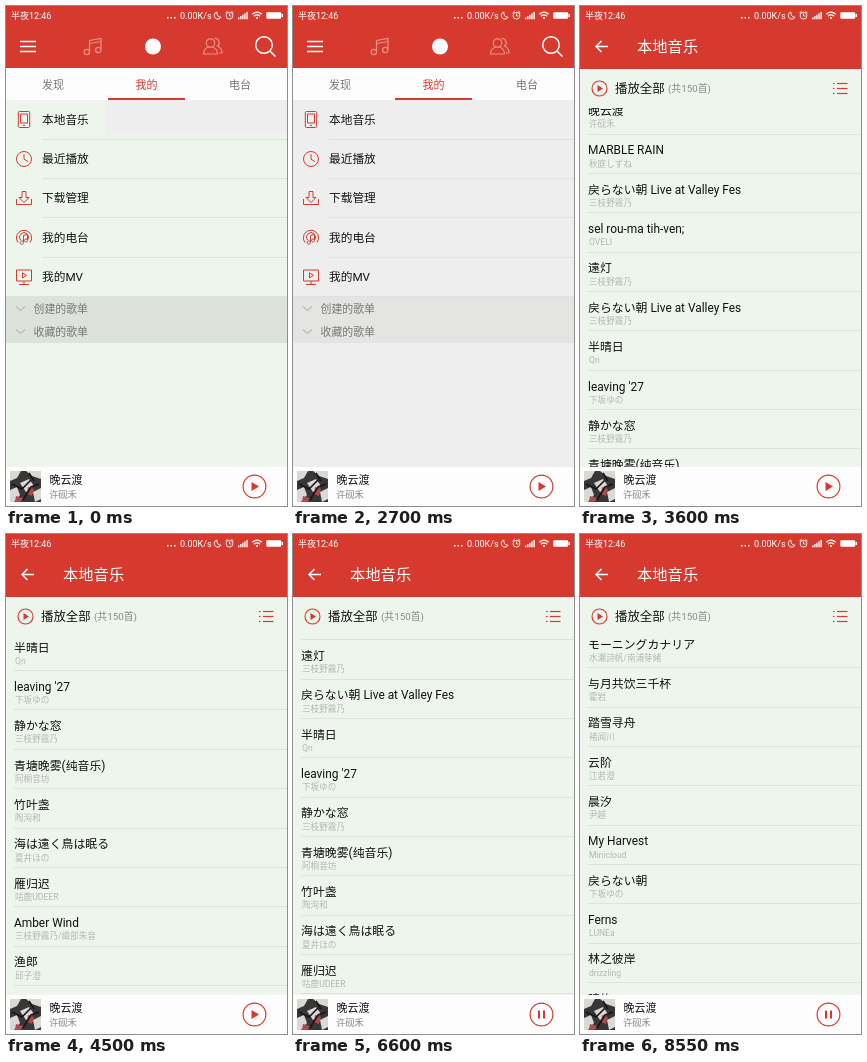
An HTML page with a canvas that plays this animation: 281x500 px, repeating every 8700 ms.

```html
<!DOCTYPE html>
<html lang="zh">
<head>
<meta charset="utf-8">
<style>
html, body { margin: 0; width: 100%; height: 100%; overflow: hidden; }
canvas { display: block; width: 281px; height: 500px; }
</style>
</head>
<body>
<canvas id="stage"></canvas>
<script>
const W = 281, H = 500, LOOP = 8700, STEP = 150;
const RED = '#d6392d', GREEN = '#eef5ed', GREY = '#eeeeee', PALE = '#ec9189';
const ROW = 39.35, LIST_TOP = 102, BAR_TOP = 461;
const canvas = document.getElementById('stage');
const ctx = canvas.getContext('2d');
const ratio = window.devicePixelRatio || 1;
canvas.width = W * ratio;
canvas.height = H * ratio;

const songs = `晚云渡|许砚禾
MARBLE RAIN|秋庭しずね
戻らない朝 Live at Valley Fes|三枝野霧乃
sel rou-ma tih-ven;|OVELI
遠灯|三枝野霧乃
戻らない朝 Live at Valley Fes|三枝野霧乃
半晴日|Qn
leaving '27|下坂ゆの
静かな窓|三枝野霧乃
青塘晚雾(纯音乐)|阿桐音坊
竹叶盏|陶洵和
海は遠く鳥は眠る|夏井ほの
雁归迟|咕鹿UDEER
Amber Wind|三枝野霧乃/織部朱音
渔郎|邱子澄
石桥灯|陶洵和
Slow Lantern|OVELI
听溪|顾绫衣
夜の庭先|夏井ほの
落笔处|D.M舟
一盏秋|顾绫衣
INIT_LUNARDRIFT/.|SORUE
风的经纬度|梁韵苔/梁亦岚
新麦香|邬岑
モーニングカナリア-Ballade Arrange-Mio Solo Ver.|南浦芽緒
云舟寄月声唱版|褚闻川/柏青鸢
策马南山|褚闻川
百川意|听苒
黛石痕|蔺禾
霜桥晚|听苒
Harbor Lines|SORUE
雨の坂道|下坂ゆの
折柳亭|邬岑
松间客|许砚禾
白い岬|南浦芽緒
モーニングカナリア|水瀬詩帆/南浦芽緒
与月共饮三千杯|霍岩
踏雪寻舟|褚闻川
云阶|江若澄
晨汐|尹越
My Harvest|Minicloud
戻らない朝|下坂ゆの
Ferns|LUNEa
林之彼岸|drizzling
晴屿|江若澄`.split('\n').map(line => line.split('|'));

function text(str, x, midY, size, color) {
  ctx.font = `${size}px Roboto, "Noto Sans CJK SC", "Noto Sans CJK", sans-serif`;
  ctx.fillStyle = color;
  ctx.fillText(str, x, midY + size * 0.37);
}

function box(x, y, w, h, color) {
  ctx.fillStyle = color;
  ctx.fillRect(x, y, w, h);
}

function stroke(d, color, width = 1) {
  ctx.strokeStyle = color;
  ctx.lineWidth = width;
  ctx.stroke(new Path2D(d));
}

function fill(d, color) {
  ctx.fillStyle = color;
  ctx.fill(new Path2D(d));
}

const circle = (x, y, r) => `M${x - r} ${y}a${r} ${r} 0 1 1 ${2 * r} 0a${r} ${r} 0 1 1 ${-2 * r} 0`;
const divider = (x, y) => box(x, Math.round(y), W - x, 1, '#dde3dc');
const smooth = p => p * p * (3 - 2 * p);

// Interpolates between [time, value] points.
function track(t, points, ease = smooth) {
  if (t <= points[0][0]) return points[0][1];
  for (let i = 1; i < points.length; i++) {
    const [t0, v0] = points[i - 1], [t1, v1] = points[i];
    if (t <= t1) return v0 + (v1 - v0) * ease((t - t0) / (t1 - t0));
  }
  return points[points.length - 1][1];
}

function drawStatus() {
  text('半夜12:46', 5, 9.5, 9, '#fff');
  for (const x of [161, 164.5, 168]) box(x, 11, 1.5, 1.5, '#fff');
  text('0.00K/s', 174, 9.5, 9, '#fff');
  stroke('M211 6a3.6 3.6 0 1 0 4 5.2a4 4 0 0 1-4-5.2', '#fff', 0.9);
  stroke(circle(223.5, 9.7, 3.4) + 'M223.5 7.6V10h1.8M219.5 7l2-1.8M227.5 7l-2-1.8', '#fff', 0.9);
  for (let i = 0; i < 5; i++) box(232 + i * 2.1, 11.5 - i * 1.4, 1.4, 1.8 + i * 1.4, '#fff');
  stroke('M246.3 8.2q4.7-4 9.4 0M248 10.2q3-2.6 6 0', '#fff', 1.2);
  fill(circle(251, 12, 1.1), '#fff');
  fill('M261.5 6.2h12.5q1.2 0 1.2 1.2v4.2q0 1.2-1.2 1.2h-12.5q-1.2 0-1.2-1.2v-4.2q0-1.2 1.2-1.2', '#fff');
  box(275.5, 8, 1.5, 3, '#fff');
}

function drawPlayer(playing) {
  box(0, BAR_TOP, W, H - BAR_TOP, '#fdfdfd');
  box(4, 465, 31, 31, '#383636');
  fill('M4 465h11l-4 7-7 3zM20 465h15v8l-9-3zM14 477l9-4 5 7-8 6zM4 484l7-3 3 8-6 7H4zM27 486l8-4v11l-6 3z', '#d9d8d5');
  fill('M22 481l6 2-2 7-5-2zM10 490l7 2-2 4H9z', '#ad4a4b');
  stroke('M6 478l10 5 9-9M17 494l8-13 8-3M23 467l5 8', '#161616', 1.6);
  text('晚云渡', 43.5, 473.8, 11, '#111');
  text('许砚禾', 43, 488.3, 9.3, '#858585');
  stroke(circle(248.5, 480.5, 11.4), RED, 1.2);
  if (playing) {
    box(245, 476.5, 2, 8, RED);
    box(250, 476.5, 2, 8, RED);
  } else {
    fill('M245.5 476v9l7.5-4.5z', RED);
  }
}

function drawMenuIcons() {
  stroke('M13.5 105.5h9q1.2 0 1.2 1.2v13.6q0 1.2-1.2 1.2h-9q-1.2 0-1.2-1.2v-13.6q0-1.2 1.2-1.2M14.5 108h7v9h-7zM17 119.4h2', RED);
  stroke(circle(18, 153, 7.5) + 'M18 148v5.2l4 2.4', RED);
  stroke('M16 185.5v6h-3l5 5 5-5h-3v-6zM10.5 193v5.5h15V193', RED);
  stroke('M12 236.5a7.6 7.6 0 1 1 12 0M14.5 234a4.5 4.5 0 1 1 7 0M17.5 236v-6.5l4-1v5.5', RED);
  stroke(circle(15.8, 236.5, 1.7) + circle(20, 234.5, 1.5), RED, 0.9);
  stroke('M10.5 264h15v11h-15zM13 278.5h10M18 275v3.5M16.5 266.8v5.2l4-2.6z', RED);
}

function drawHome(t) {
  const early = t < 750;
  box(0, 0, W, H, early ? GREEN : GREY);
  if (early) box(100, 94, W - 100, 35, GREY);
  box(0, 0, W, 62, RED);
  box(0, 62, W, 32, '#fdfdfd');

  stroke('M14 35.5h16M14 40.5h16M14 45.5h16', '#fff', 1.3);
  stroke('M83.5 46V34.5l11.5-2V44M83.5 37.5l11.5-2' + circle(80.8, 46, 2.7) + circle(92.3, 44, 2.7), PALE, 1.2);
  fill(circle(147, 40.5, 8), '#fff');
  stroke(circle(204.5, 37, 4.2) + 'M202.5 41q-5 2-5 7h14q0-5-5-7M208.5 32.5a4.2 4.2 0 0 1 3 7.5q4.5 2 4.5 7h-3', PALE, 1.2);
  stroke(circle(258, 39, 8.3) + 'M264 45l5.5 5.5', '#fff', 1.5);

  text('发现', 36, 78.5, 11, '#777');
  text('我的', 129.5, 78.5, 11, RED);
  text('电台', 223, 78.5, 11, '#777');
  box(102, 92, 77, 2, RED);

  ['本地音乐', '最近播放', '下载管理', '我的电台', '我的MV'].forEach((label, i) => {
    text(label, 36, 113.5 + i * 39.3, 11.7, '#151515');
    if (i < 4) divider(36, 132.8 + i * 39.3);
  });
  drawMenuIcons();

  box(0, 290, W, 47, early ? '#dde3db' : '#e4e4e2');
  divider(0, 290);
  ['创建的歌单', '收藏的歌单'].forEach((label, i) => {
    const y = 302.5 + i * 23;
    stroke(`M10 ${y - 2}l4.5 4 4.5-4`, '#b9bab7', 1.1);
    text(label, 27.5, y, 10.9, '#777');
  });
  drawPlayer(false);
}

function drawRows(scroll) {
  ctx.save();
  ctx.beginPath();
  ctx.rect(0, LIST_TOP, W, BAR_TOP - LIST_TOP);
  ctx.clip();
  songs.forEach(([title, artist], i) => {
    const y = 118 + i * ROW - scroll;
    if (y < 70 || y > 485) return;
    text(title, 8, y, 11.9, '#111');
    text(artist, 9, y + 13.5, 8.6, '#b3b8b2');
    divider(8, y + 23);
  });
  ctx.restore();
}

function drawList(t) {
  box(0, 0, W, H, GREEN);
  box(0, 0, W, 63, RED);
  stroke('M28 40.5H16.5M21.5 35L16 40.5l5.5 5.5', '#fff', 1.5);
  text('本地音乐', 57, 40.2, 15.3, '#fff');

  stroke(circle(19.5, 82.5, 7.5), RED, 1.1);
  fill('M17.5 79v7l5.5-3.5z', RED);
  text('播放全部', 35, 82.5, 12.4, '#151515');
  text('(共150首)', 88, 82.5, 9.8, '#888');
  for (const y of [77.5, 82.5, 87.5]) {
    box(253, y - 0.6, 1.6, 1.2, RED);
    box(257, y - 0.6, 10.5, 1.2, RED);
  }

  drawRows(track(t, [[3450, 0], [4500, 241], [5250, 0], [6300, 0], [7350, 776], [8550, 1385]]));

  const glow = track(t, [[5100, 0], [5400, 1], [5850, 0]], p => p);
  if (glow > 0) {
    const side = LIST_TOP + 25 * glow;
    ctx.globalAlpha = 0.48 * Math.sqrt(glow);
    fill(`M0 ${LIST_TOP}H${W}V${side}Q${W / 2} ${side + 34 * glow} 0 ${side}z`, '#de3c3c');
    ctx.globalAlpha = 1;
  }
  drawPlayer(t >= 6150);
}

function shifted(x, draw, t) {
  ctx.save();
  ctx.translate(x, 0);
  draw(t);
  ctx.restore();
}

function render(t) {
  ctx.setTransform(ratio, 0, 0, ratio, 0, 0);
  const slide = track(t, [[2700, 0], [3469, 1]]);
  const edge = Math.round(W * (1 - slide));
  if (edge > 0) {
    shifted(Math.round(-62 * slide), drawHome, t);
    box(0, 0, edge, H, `rgba(0,0,0,${0.32 * slide})`);
  }
  if (slide > 0) shifted(edge, drawList, t);
  drawStatus();
}

function tick() {
  const t = performance.now() % LOOP;
  render(Math.floor(t / STEP) * STEP);
  requestAnimationFrame(tick);
}
tick();
</script>
</body>
</html>
```
